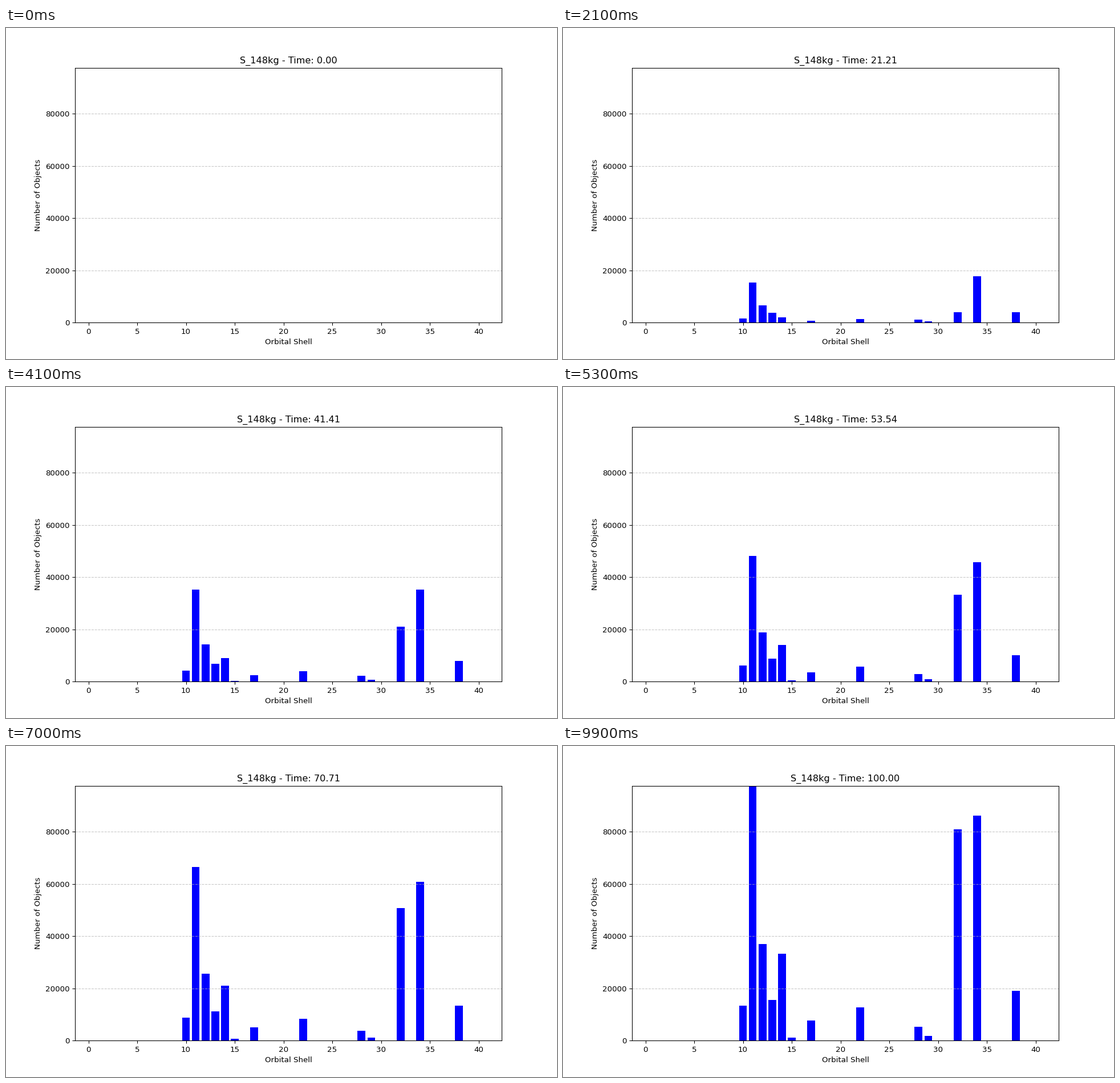
Animation of 966x580 px, one loop 10000 ms. Source, as a matplotlib script:

```python
import numpy as np
import matplotlib.pyplot as plt
from matplotlib.animation import FuncAnimation

WIDTH, HEIGHT, DPI = 966, 580, 96.6
FRAMES = 100
INTERVAL = 100
T_END = 100
Y_MAX = 97600
KNEE, SOFTNESS = 21, 5.6

# Shell: growth rate before and after the knee, in objects per unit of time
RATES = {
    10: (52, 157), 11: (645, 1064), 12: (300, 389), 13: (182, 149.5),
    14: (26, 414), 15: (6, 11.5), 17: (25, 90), 22: (45, 149),
    28: (50, 53.8), 29: (19, 16.5), 32: (0, 1025), 34: (832, 870),
    38: (192, 189.5),
}
early, late = np.array(list(RATES.values())).T


def ramp(t):
    """Time past the knee, rounded off around it and zero at the start."""
    def soft(x):
        return SOFTNESS * np.log1p(np.exp((x - KNEE) / SOFTNESS))
    return soft(t) - soft(0)


def counts(t):
    return early * t + (late - early) * ramp(t)


# The small margin keeps the pixel size from rounding down
fig, ax = plt.subplots(figsize=((WIDTH + 0.01) / DPI, (HEIGHT + 0.01) / DPI),
                       dpi=DPI)
bars = ax.bar(list(RATES), np.zeros(len(RATES)), color="blue")
ax.set_xlim(-1.39, 42.39)
ax.set_ylim(0, Y_MAX)
ax.set_xlabel("Orbital Shell")
ax.set_ylabel("Number of Objects")
ax.grid(axis="y", linestyle="--", alpha=0.7)
title = ax.set_title("")


def update(i):
    t = T_END * i / (FRAMES - 1)
    for bar, count in zip(bars, counts(t)):
        bar.set_height(count)
    title.set_text(f"S_148kg - Time: {t:.2f}")
    return [*bars, title]


anim = FuncAnimation(fig, update, frames=FRAMES, interval=INTERVAL,
                     blit=False, repeat=True)
plt.show()
```
